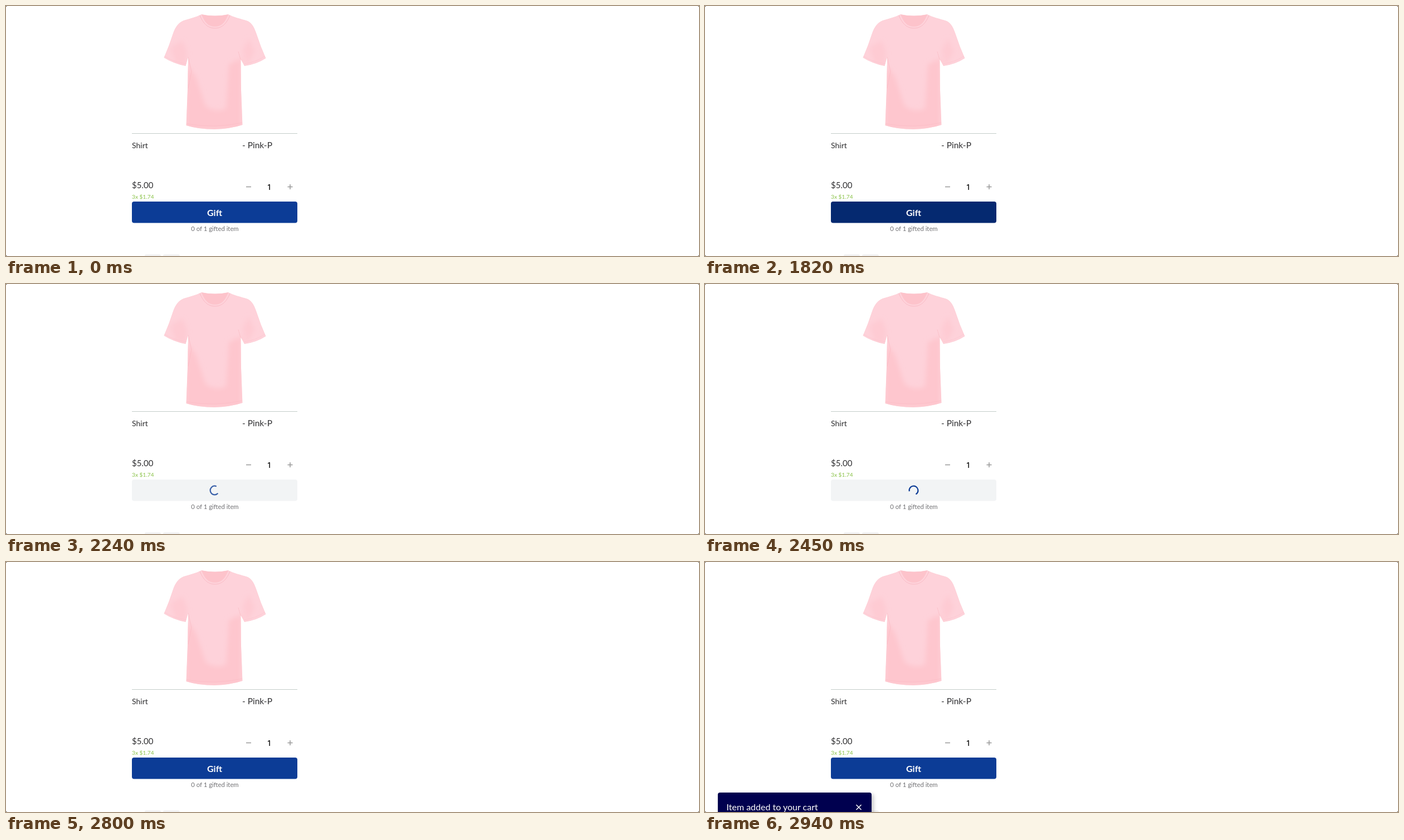
An HTML page that plays this animation: 1244x450 px, repeating every 3780 ms.

```html
<!DOCTYPE html>
<html lang="en">
<head>
<meta charset="utf-8">
<title>Gift button</title>
<style>
  html, body { margin: 0; width: 100%; height: 100%; overflow: hidden; background: #fff; }
  svg { display: block; width: 1244px; height: 450px; font-family: Lato, sans-serif; }
  .ink { fill: #303032; }
  .icon { fill: none; stroke: #989898; stroke-width: 1.5; }
</style>
</head>
<body>
<svg viewBox="0 0 1244 450">
  <defs>
    <path id="shape" d="M351 15 C341 20 329 23 319 26 C309 30 304 38 300 49 Q293 71 283.5 93 Q301 104 322.5 108 L327 92 L326 150 L323.5 215 Q346 222 374 222 Q403 221 424.5 214 L422 150 L421.5 96 L428 108 Q450 105 466.5 94 Q457 73 450 51 C446 39 442 31 434 27 C422 23 408 20 399 15 Q375 20 351 15Z"/>
    <clipPath id="cut"><use href="#shape"/></clipPath>
    <filter id="soft" x="-50%" y="-50%" width="200%" height="200%"><feGaussianBlur stdDeviation="4"/></filter>
    <filter id="shadow" x="-10%" y="-20%" width="125%" height="150%">
      <feDropShadow dx="4" dy="3" stdDeviation="3" flood-color="#000" flood-opacity=".2"/>
    </filter>
  </defs>

  <g clip-path="url(#cut)">
    <use href="#shape" fill="#fed2da"/>
    <g filter="url(#soft)" fill="#fec4cb">
      <path d="M325 105 L341 128 L358 180 Q375 193 395 185 L400 105 L423 94 V222 H323Z" opacity=".8"/>
      <path d="M295 75 L317 62 L325 82 L323 108 L305 104Z" opacity=".5"/>
      <path d="M425 80 L436 58 L447 82 L432 108Z" opacity=".5"/>
    </g>
    <g fill="none" stroke="#f9b8c2">
      <path d="M327 92 L333 118 L327 148" stroke-width="1.2" opacity=".5"/>
      <path d="M421 96 L417 82" opacity=".6"/>
      <path d="M284 90 Q301 101 324 104 M428 104 Q449 101 465 90" opacity=".35"/>
      <path d="M324 212 Q374 221 424 210" opacity=".5"/>
    </g>
    <path d="M351 15 Q375 20 399 15 C393 31 386 37 375 37 C364 37 357 31 351 15Z" fill="#fdc3cb"/>
    <path d="M348 17 C355 34 364 40 375 40 C386 40 395 34 402 17" fill="none" stroke="#f9bac4"/>
    <use href="#shape" fill="none" stroke="#fbc6ce" opacity=".6"/>
  </g>

  <path d="M226 229.5H523" stroke="#c3cdc9"/>
  <text class="ink" x="226" y="256" font-size="14">Shirt</text>
  <text class="ink" x="424" y="256" font-size="15.5">- Pink-P</text>
  <text class="ink" x="226" y="328" font-size="15">$5.00</text>
  <text x="226" y="347" font-size="10.2" fill="#8bc34a">3x $1.74</text>
  <path class="icon" d="M431 325.5H440M505.5 325.5H514.5M510 321V330"/>
  <text x="472.3" y="331" font-size="13" font-weight="500" font-family="Inter, sans-serif" text-anchor="middle">1</text>

  <rect id="button" x="226" y="352" width="297" height="38.5" rx="4"/>
  <text id="label" x="374.5" y="378" font-size="16" font-weight="700" fill="#fff" text-anchor="middle">Gift</text>
  <circle id="spinner" cx="374.5" cy="371.5" r="7.9" fill="none" stroke="#0c3c96" stroke-width="2.2" pathLength="100" stroke-dasharray="70 30"/>
  <text x="375" y="404.5" font-size="11.3" fill="#707073" text-anchor="middle">0 of 1 gifted item</text>

  <path d="M249 450Q249 447 252 447H275Q278 447 278 450ZM282 450Q282 447 285 447H309Q312 447 312 450Z" fill="#f2f2f3"/>

  <g id="toast">
    <rect x="23" y="415" width="276" height="54" rx="4" fill="#040250" filter="url(#shadow)"/>
    <text x="38.5" y="447" font-size="16" fill="#fff">Item added to your cart</text>
    <path d="M271.5 437L280.5 446M280.5 437L271.5 446" stroke="#fff" stroke-width="1.5"/>
  </g>

  <path d="M0 0H2L0 2ZM1244 0H1242L1244 2ZM0 450H2L0 448ZM1244 450H1242L1244 448Z" fill="#777"/>
</svg>
<script>
  const LOOP = 3780, TICK = 70, TURN = 600;
  const LOAD_START = 2240, LOAD_END = 2800;
  const [button, label, spinner, toast] =
    ['button', 'label', 'spinner', 'toast'].map(id => document.getElementById(id));

  // [start time, value]
  const fills = [[0, '#0c3c96'], [1820, '#052970'], [1890, '#0c3c96'],
                 [LOAD_START, '#f2f4f5'], [LOAD_END, '#0c3c96']];
  const toastDrops = [[0, 80], [2870, 16], [2940, 0]];

  const valueAt = (steps, t) => steps.filter(([start]) => start <= t).pop()[1];
  const show = (node, on) => node.setAttribute('visibility', on ? 'visible' : 'hidden');

  function draw(now) {
    const t = Math.floor((now % LOOP) / TICK) * TICK;
    const loading = t >= LOAD_START && t < LOAD_END;
    const angle = (t - LOAD_START + TICK) / TURN * 360;

    button.setAttribute('fill', valueAt(fills, t));
    show(label, !loading);
    show(spinner, loading);
    spinner.setAttribute('transform', `rotate(${angle} 374.5 371.5)`);
    spinner.setAttribute('opacity', t === LOAD_START ? 0.8 : 1);
    toast.setAttribute('transform', `translate(0 ${valueAt(toastDrops, t)})`);
  }

  const begin = performance.now();
  function frame() {
    draw(performance.now() - begin);
    requestAnimationFrame(frame);
  }
  frame();
</script>
</body>
</html>
```
